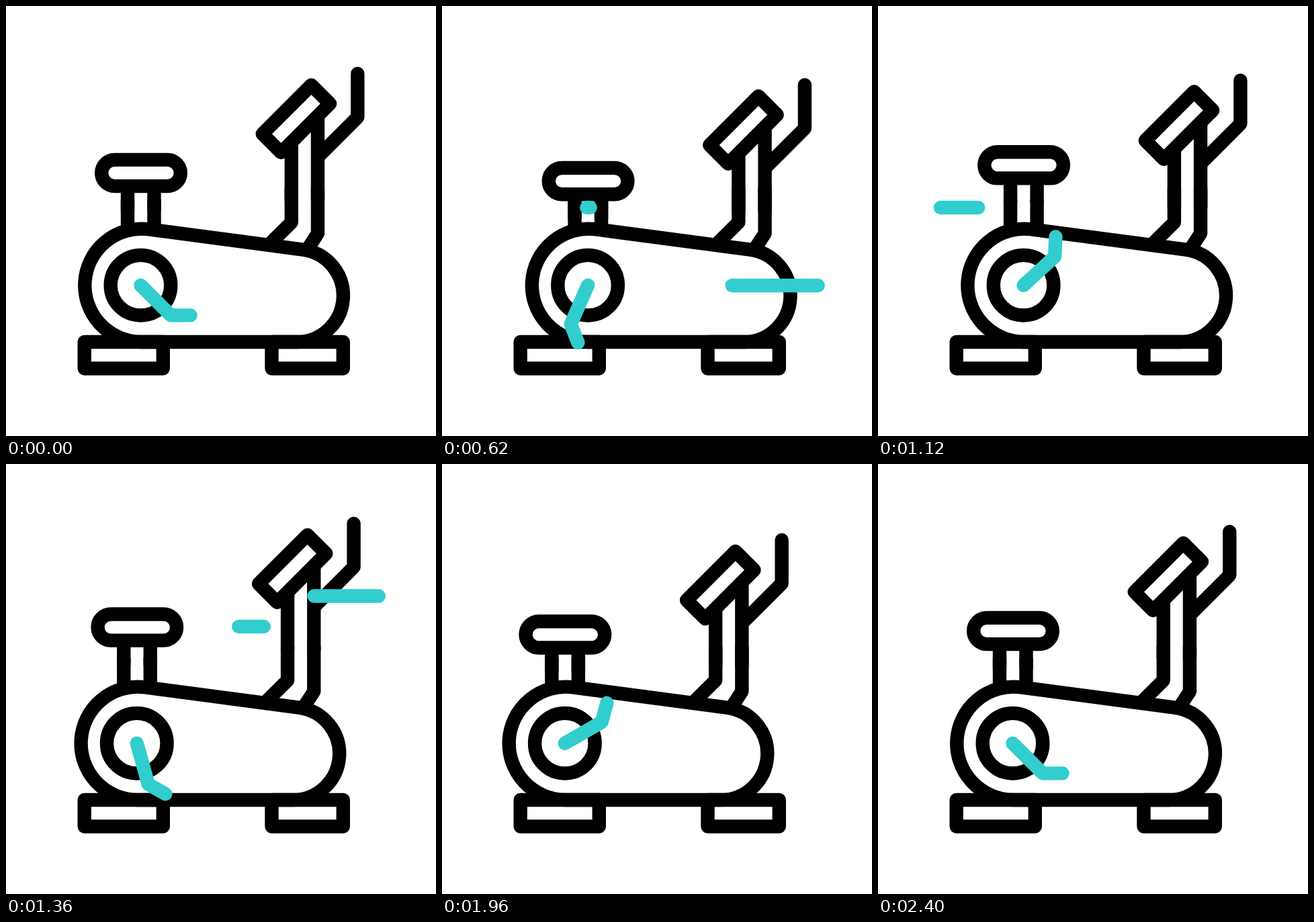
These frames come from a looping animation (640x640 px, 3 s). An HTML page:

```html
<!DOCTYPE html>
<html lang="en">
<head>
<meta charset="utf-8">
<title>Exercise bike</title>
<style>
  html, body { margin: 0; width: 100%; height: 100%; overflow: hidden; background: #fff; }
  svg { display: block; width: 100vw; height: 100vh; }
  .ink { fill: none; stroke: #000; stroke-width: 20.4; stroke-linejoin: round; }
  .round { stroke-linecap: round; }
  .teal { fill: none; stroke: #32cdcd; stroke-width: 20.4; stroke-linecap: round; stroke-linejoin: round; }
</style>
</head>
<body>
<svg viewBox="0 0 640 640">
  <g class="ink">
    <path d="M116.7 500H233.8V539.5H116.7Z"/>
    <path d="M395.5 500H501.8V539.5H395.5Z"/>
  </g>
  <g id="bike">
    <g class="ink">
      <!-- fixed lower halves of posts and stem -->
      <path d="M181 288V332M220.5 288V332"/>
      <path class="round" d="M424.8 272V322L393 353.5M464 272V338.5L450 360"/>
      <path d="M200.5 500A84.2 84.2 0 1 1 211.5 332.2L442 362.6A69 69 0 0 1 433 500Z"/>
      <circle cx="200.5" cy="415.7" r="44.8"/>
      <g id="seat">
        <path d="M181 268V305M220.5 268V305"/>
        <rect x="142.2" y="228.9" width="117.6" height="39.2" rx="19.6"/>
      </g>
      <g id="bars">
        <path d="M424.8 202.5V290M464 163.5V290"/>
        <path d="M454.4 117.7L482.1 145.4L409.4 218.1L381.7 190.4Z"/>
        <path class="round" d="M523.3 100.8V165.5L465 223.8"/>
      </g>
    </g>
    <path id="crank" class="teal" d="M200.5 415.7L245.2 460.4H274.6"/>
  </g>
  <g id="wind" class="teal"></g>
</svg>
<script>
const LOOP = 3000, STEP = 20, TRIM = 500;
const $ = id => document.getElementById(id);

// Each track is a list of [time, value], eased in and out between keys
const tracks = {
  shift: [[200, 0], [900, 25.6], [1700, -25.6], [2400, 0]],
  bars:  [[200, 0], [900, 25.6], [1400, -12.8], [1900, 12.8], [2400, 0]],
  seat:  [[230, 0], [683, 12.8], [1183, -12.8], [1683, 12.8], [2183, 0]],
  turn:  [[200, 0], [2400, 720]]
};

// Wind streaks: height, right end, left end, start of head, start of tail
const streaks = [
  [416, 583.3, 420.5, 200, 500],
  [300, 220.7, 93, 558, 850],
  [242, 386.7, 296, 1128, 1306],
  [196.5, 554.8, 350, 1120, 1420]
].map(([y, from, to, head, tail]) => {
  const el = document.createElementNS("http://www.w3.org/2000/svg", "path");
  $("wind").append(el);
  return { el, y, head: [[head, from], [head + TRIM, to]], tail: [[tail, from], [tail + TRIM, to]] };
});

function at(keys, t) {
  if (t <= keys[0][0]) return keys[0][1];
  for (let i = 1; i < keys.length; i++) {
    const [t0, a] = keys[i - 1], [t1, b] = keys[i];
    if (t < t1) {
      const u = (t - t0) / (t1 - t0);
      return a + (b - a) * u * u * (3 - 2 * u);
    }
  }
  return keys[keys.length - 1][1];
}

function draw(t) {
  const move = (id, x, y) => $(id).setAttribute("transform", `translate(${x} ${y})`);
  move("bike", at(tracks.shift, t), 0);
  move("seat", 0, at(tracks.seat, t));
  move("bars", 0, at(tracks.bars, t));
  $("crank").setAttribute("transform", `rotate(${at(tracks.turn, t)} 200.5 415.7)`);
  for (const s of streaks) {
    const head = at(s.head, t), tail = at(s.tail, t);
    s.el.setAttribute("d", tail > head ? `M${tail} ${s.y}H${head}` : "");
  }
}

const start = performance.now();
function tick() {
  const t = (performance.now() - start) % LOOP;
  draw(Math.floor(t / STEP) * STEP);
  requestAnimationFrame(tick);
}
tick();
</script>
</body>
</html>
```
